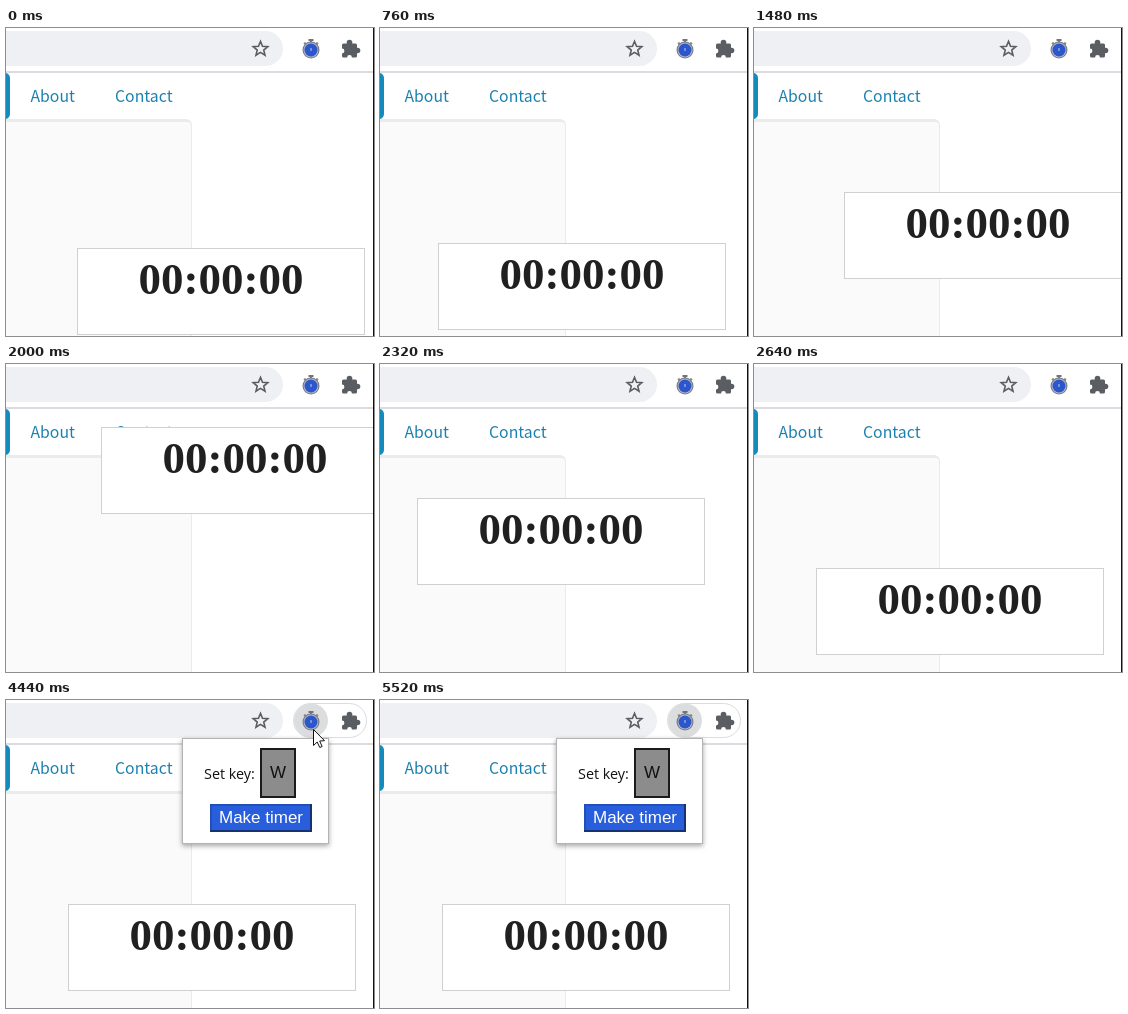
Animation of 368x308 px, one loop 5960 ms. Source, as an HTML page with a canvas:

```html
<!DOCTYPE html>
<html lang="en">
<head>
<meta charset="utf-8">
<title>Timer</title>
<style>
html, body { margin: 0; width: 100%; height: 100%; overflow: hidden; background: #fff; }
canvas { display: block; }
</style>
</head>
<body>
<canvas id="stage" width="368" height="308"></canvas>
<script>
const ctx = document.getElementById('stage').getContext('2d');
const LOOP = 5960, STEP = 40;
const DRAG_AT = 120, DROP_AT = 2640, HOVER_AT = 3440, POPUP_AT = 3480, LEAVE_AT = 5120, GONE_AT = 5520;
const SANS = '"Liberation Sans", Arial, sans-serif';

// Turning points; swing bends the way to the next point sideways.
const drag = [
  { t: DRAG_AT, x: 56, y: 218, swing: [-8, -140] },
  { t: 680, x: 30, y: 200, swing: [45, 30] },
  { t: 1080, x: 43, y: 174, swing: [-10, 45] },
  { t: 1480, x: 90, y: 164, swing: [-55, -10] },
  { t: 2000, x: 95, y: 63, swing: [-42, 0] },
  { t: DROP_AT, x: 62, y: 204 }
];
const icon = { x: 307, y: 29 };
const pointer = [
  { t: DROP_AT, x: 229, y: 256 },
  { t: 3100, x: 162, y: 211 },
  { t: HOVER_AT, ...icon },
  { t: 3680, x: 205, y: 113 },
  { t: 3840, ...icon },
  { t: LEAVE_AT, ...icon },
  { t: GONE_AT, x: 148, y: 310 }
];

function locate(path, t) {
  const i = path.findIndex(p => p.t > t);
  if (i < 1) return i ? path[path.length - 1] : path[0];
  const a = path[i - 1], b = path[i];
  const u = (t - a.t) / (b.t - a.t), ease = u * u * (3 - 2 * u), bend = Math.sin(Math.PI * u);
  const [sx, sy] = a.swing || [0, 0];
  return {
    x: Math.round(a.x + (b.x - a.x) * ease + sx * bend),
    y: Math.round(a.y + (b.y - a.y) * ease + sy * bend)
  };
}

function rect(x, y, w, h, color) {
  ctx.fillStyle = color;
  ctx.fillRect(x, y, w, h);
}

function rounded(x, y, w, h, r, fill, stroke) {
  ctx.beginPath();
  ctx.roundRect(x, y, w, h, r);
  ctx.fillStyle = fill;
  ctx.fill();
  if (!stroke) return;
  ctx.strokeStyle = stroke;
  ctx.lineWidth = 1;
  ctx.stroke();
}

function disc(x, y, r, color) {
  ctx.fillStyle = color;
  ctx.beginPath();
  ctx.arc(x, y, r, 0, Math.PI * 2);
  ctx.fill();
}

function label(str, x, y, font, color, align = 'left') {
  ctx.font = font;
  ctx.fillStyle = color;
  ctx.textAlign = align;
  ctx.fillText(str, x, y);
}

function page() {
  rect(0, 0, 368, 308, '#fff');
  rounded(-20, 45, 24, 46, 5, '#148bbb');
  const nav = '15.8px "Noto Sans CJK JP", "Noto Sans CJK SC", "Noto Sans", sans-serif';
  label('About', 24.5, 74, nav, '#1a80b0');
  label('Contact', 109, 74, nav, '#1a80b0');
  rounded(-20, 91, 206, 240, 6, '#ebebeb');
  rounded(-20, 94, 205, 240, 4, '#fafafa');
}

function timerBox({ x, y }) {
  rect(x, y, 288, 87, '#d0d0d0');
  rect(x + 1, y + 1, 286, 85, '#fff');
  label('00:00:00', x + 144, y + 45.5, 'bold 45px "Liberation Serif", "Times New Roman", serif', '#202020', 'center');
}

function star(x, y) {
  ctx.beginPath();
  for (let i = 0; i < 10; i++) {
    const a = -Math.PI / 2 + i * Math.PI / 5, r = i % 2 ? 3.4 : 7.7;
    ctx.lineTo(x + r * Math.cos(a), y + r * Math.sin(a));
  }
  ctx.closePath();
  ctx.strokeStyle = '#5a5e63';
  ctx.lineWidth = 1.6;
  ctx.stroke();
}

function stopwatch(x, y) {
  rect(x - 2.5, y - 10, 5, 2, '#70757d');
  rect(x - 1, y - 9, 2, 3, '#70757d');
  for (const side of [-1, 1]) disc(x + side * 6, y - 5.5, 1.3, '#80858d');
  disc(x, y + 1, 8.5, '#777b83');
  disc(x, y + 1, 7.4, '#b4b9c6');
  disc(x, y + 1, 6.5, '#2b56cc');
  rect(x - 0.5, y - 1, 1, 3, '#c3cdec');
}

function puzzle(x, y) {
  rounded(x - 8.5, y - 5, 15, 14, 1.5, '#5a5e63');
  disc(x - 1, y - 6, 2.8, '#5a5e63');
  disc(x + 7, y + 2, 2.8, '#5a5e63');
  disc(x - 8.5, y + 2.5, 2.4, '#fff');
  disc(x - 1, y + 9, 2.4, '#fff');
}

function toolbar(hover) {
  rect(0, 0, 368, 43, '#fff');
  rounded(-40, 3, 317, 35, 17.5, '#eff0f4');
  rect(0, 43, 368, 2, '#dbdbe1');
  star(254.5, 21);
  if (hover) {
    rounded(287.5, 3.5, 73, 34, 17, '#fff', '#dadce0');
    disc(305, 20.5, 17, '#dcddde');
  }
  stopwatch(305, 21);
  puzzle(344.5, 20.5);
}

function popup() {
  ctx.save();
  ctx.shadowColor = 'rgba(0,0,0,.35)';
  ctx.shadowBlur = 5;
  ctx.shadowOffsetY = 2;
  rect(176, 38, 147, 106, '#b4b4b4');
  ctx.restore();
  rect(177, 39, 145, 104, '#fff');
  label('Set key:', 198, 79, '14.4px "Open Sans", "Noto Sans", sans-serif', '#111');
  rect(254, 48, 36, 50, '#1b1b1b');
  rect(256, 50, 32, 46, '#8c8c8c');
  label('W', 272, 78, '17px ' + SANS, '#111', 'center');
  rect(204, 104, 102, 28, '#17326f');
  rect(204, 104, 100, 26, '#2350b8');
  rect(206, 106, 98, 24, '#285edb');
  label('Make timer', 255, 123, '17px ' + SANS, '#fff', 'center');
}

function cursor({ x, y }) {
  ctx.save();
  ctx.translate(x + 0.5, y + 0.5);
  const arrow = new Path2D('M0 0V16L3.7 12.5L6.3 18L8.6 17L6.2 11.5L11 11.2Z');
  ctx.fillStyle = '#fff';
  ctx.fill(arrow);
  ctx.strokeStyle = '#111';
  ctx.lineWidth = 1;
  ctx.stroke(arrow);
  ctx.restore();
}

function draw(t) {
  page();
  timerBox(t < DRAG_AT ? { x: 71, y: 220 } : locate(drag, t));
  toolbar(t >= HOVER_AT);
  if (t >= POPUP_AT) popup();
  if (t > DROP_AT && t < GONE_AT) cursor(locate(pointer, t));
  rect(367, 0, 1, 308, '#111');
}

const start = performance.now();
function tick() {
  const t = (performance.now() - start) % LOOP;
  draw(Math.floor(t / STEP) * STEP);
  requestAnimationFrame(tick);
}
tick();
</script>
</body>
</html>
```
